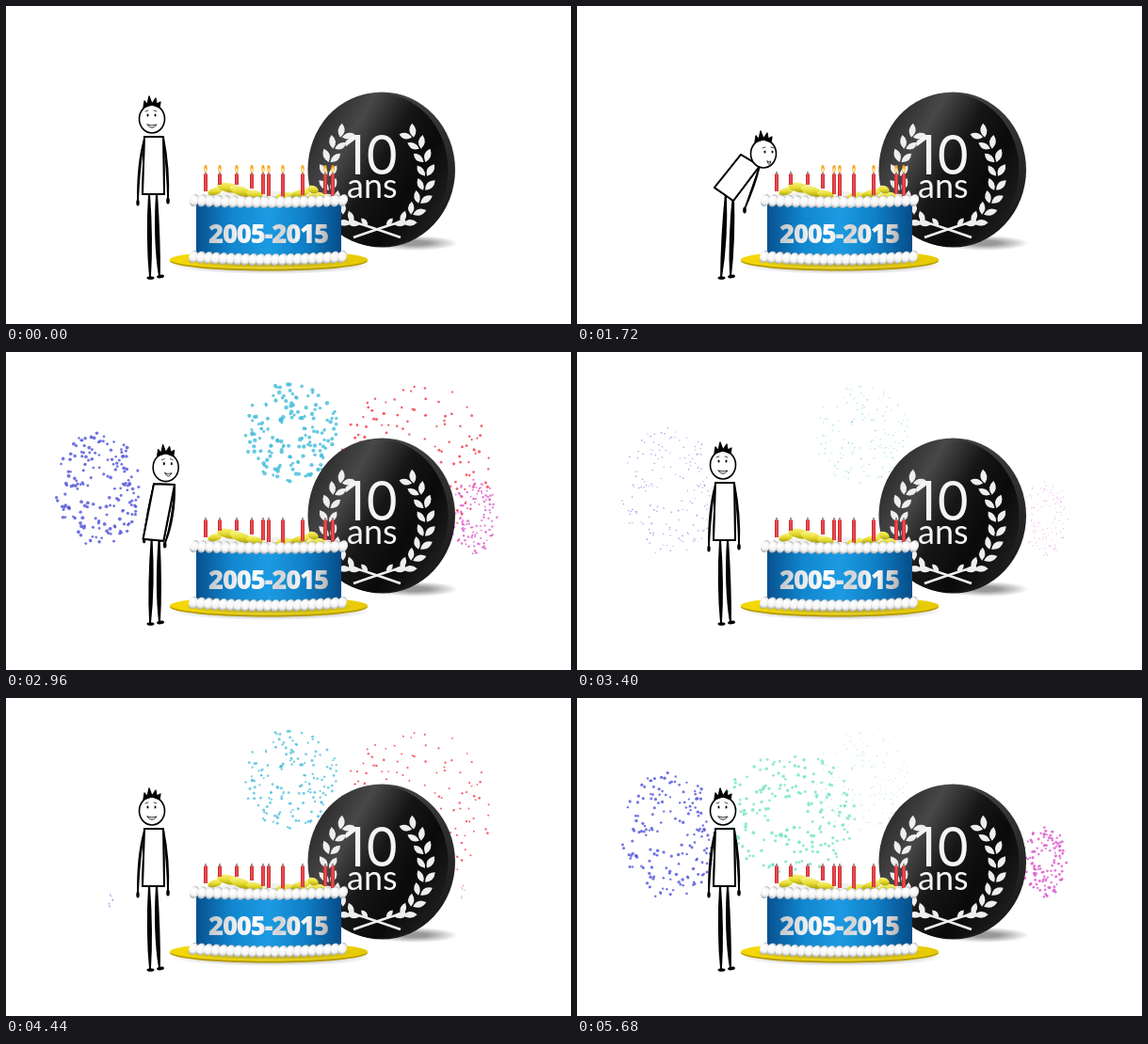
These frames come from a looping animation (600 px wide and 338 px high, 5.72 s). An HTML page with a canvas:

```html
<!DOCTYPE html>
<html lang="fr">
<head>
<meta charset="utf-8">
<title>10 ans</title>
<style>
html, body { margin: 0; width: 100%; height: 100%; overflow: hidden; background: #fff; }
canvas { display: block; }
</style>
</head>
<body>
<canvas id="stage" width="600" height="338"></canvas>
<script>
const LOOP = 5720, STEP = 40, TAU = Math.PI * 2;
const stage = document.getElementById('stage').getContext('2d');
const scenery = document.createElement('canvas');
scenery.width = 600;
scenery.height = 338;

const mix = (a, b, k) => a + (b - a) * k;

function seeded(seed) {
  return () => (seed = (seed * 16807) % 2147483647) / 2147483647;
}

function oval(c, x, y, rx, ry, fill, turn = 0) {
  c.beginPath();
  c.ellipse(x, y, rx, ry, turn, 0, TAU);
  c.fillStyle = fill;
  c.fill();
}

function gradient(c, x0, y0, x1, y1, ...colors) {
  const g = c.createLinearGradient(x0, y0, x1, y1);
  colors.forEach((color, i) => g.addColorStop(i / (colors.length - 1), color));
  return g;
}

function softShadow(c, x, y, rx, ry, alpha) {
  c.save();
  c.translate(x, y);
  c.scale(rx, ry);
  const g = c.createRadialGradient(0, 0, 0.3, 0, 0, 1);
  g.addColorStop(0, `rgba(0,0,0,${alpha})`);
  g.addColorStop(1, 'rgba(0,0,0,0)');
  oval(c, 0, 0, 1, 1, g);
  c.restore();
}

// --- Medal ---
function leaf(c, x, y, angle, length) {
  c.save();
  c.translate(x, y);
  c.rotate(angle);
  c.beginPath();
  c.moveTo(0, 0);
  c.quadraticCurveTo(length * 0.5, -length * 0.5, length, 0);
  c.quadraticCurveTo(length * 0.5, length * 0.42, 0, 0);
  c.fill();
  c.restore();
}

function branch(c, side) {
  c.save();
  c.translate(394, 180);
  c.scale(side, 1);
  for (let i = 0; i < 8; i++) {
    const a = mix(1.02, -0.74, i / 7);
    const x = 53 * Math.cos(a), y = 60 * Math.sin(a);
    const ahead = Math.atan2(-60 * Math.cos(a), 53 * Math.sin(a));
    leaf(c, x, y, ahead + 0.55, 15);
    leaf(c, x - 2, y, ahead - 0.65, 14);
  }
  c.lineWidth = 2.8;
  c.beginPath();
  c.moveTo(30, 48);
  c.quadraticCurveTo(12, 53, -25, 66);
  c.stroke();
  leaf(c, 18, 52, -0.1, 14);
  leaf(c, 10, 54, -0.9, 11);
  c.restore();
}

function medal(c) {
  softShadow(c, 434, 252, 46, 8, 0.4);
  oval(c, 399.5, 174, 77.5, 82.5, gradient(c, 400, 92, 477, 240, '#444', '#2c2c2c', '#161616'));
  oval(c, 395, 174, 74.5, 81.5, gradient(c, 325, 130, 465, 210, '#2a2a2a', '#484848', '#161616', '#0a0a0a', '#1c1c1c'));
  c.fillStyle = c.strokeStyle = gradient(c, 340, 120, 450, 240, '#eee', '#fff', '#d4d4d4');
  branch(c, -1);
  branch(c, 1);
  c.fillStyle = '#f4f4f4';
  c.font = '400 57px Inter, sans-serif';
  c.fillText('10', 358, 178.5);
  c.font = '400 36px Lato, sans-serif';
  c.fillText('ans', 362, 204);
}

// --- Cake ---
const candles = [[212, 197], [227, 190], [245, 190], [261, 194], [273, 200],
  [279, 202], [294, 203], [315, 201], [339, 200], [347, 202]];

function frosting(c, y, bow, x0, x1, count) {
  for (let i = 0; i <= count; i++) {
    const u = i / count * 2 - 1;
    const x = mix(x0, x1, i / count), cy = y + bow * (1 - u * u);
    const g = c.createRadialGradient(x - 1, cy - 2, 1, x, cy, 7);
    g.addColorStop(0, '#fff');
    g.addColorStop(0.55, '#f3f3f3');
    g.addColorStop(1, '#9a9da2');
    oval(c, x, cy, 4.8, 6.8, g, 0.4);
  }
}

function fruit(c, x, y, rx, ry, turn) {
  oval(c, x, y, rx, ry, gradient(c, x, y - ry, x, y + ry, '#f6f07a', '#e6dc30', '#b0a814'), turn);
}

// The largest type size at which the date fills the given width.
function date(c, text, x, y, width, tracking) {
  const font = size => `800 condensed ${size}px "Open Sans", "Liberation Sans", sans-serif`;
  c.font = font(100);
  const size = (width - tracking * text.length) / c.measureText(text).width * 100;
  c.font = font(Math.min(38, size));
  c.letterSpacing = tracking + 'px';
  c.fillText(text, x, y);
  c.letterSpacing = '0px';
}

function cake(c) {
  softShadow(c, 282, 276, 106, 9, 0.35);
  oval(c, 279, 271, 105, 10.5, '#b79c00');
  oval(c, 279, 269.5, 105, 10, gradient(c, 174, 0, 384, 0, '#f3d500', '#ffe92e', '#e6c800'));
  softShadow(c, 279, 271, 92, 9, 0.35);

  c.fillStyle = gradient(c, 202, 0, 356, 0, '#07518f', '#1187cf', '#1c9be2', '#0f7fc6', '#064c88');
  c.beginPath();
  c.moveTo(202, 207);
  c.lineTo(356, 207);
  c.lineTo(356, 266);
  c.quadraticCurveTo(279, 275, 202, 266);
  c.fill();

  oval(c, 279, 205, 82, 8, '#f1f1ec');
  fruit(c, 222, 197, 8, 4, -0.3);
  fruit(c, 236, 193, 12, 5, 0.2);
  fruit(c, 250, 197, 13, 5, 0.35);
  fruit(c, 264, 200, 9, 4, 0.2);
  fruit(c, 297, 203, 11, 5, -0.1);
  fruit(c, 313, 199, 11, 4, -0.3);
  fruit(c, 329, 203, 10, 5, -0.2);
  fruit(c, 326, 195, 6, 4, 0.4);
  for (const [x, foot] of candles) {
    c.fillStyle = '#333';
    c.fillRect(x - 0.5, 176, 1, 3);
    c.fillStyle = gradient(c, x - 2, 0, x + 2.5, 0, '#c9242b', '#f0565a', '#b5151d');
    c.fillRect(x - 2, 178.5, 4, foot - 178.5);
  }
  frosting(c, 206.5, 2, 200, 358, 19);
  frosting(c, 266.5, 3, 199, 357, 20);

  c.fillStyle = gradient(c, 215, 226, 341, 250, '#b9bfc4', '#e4e6e8', '#fff', '#d0d2d4', '#fafafa', '#b8b6b4');
  date(c, '2005-2015', 215, 251.5, 127, -1.2);
}

function flames(t) {
  for (const [x] of candles) {
    if (t >= 1560 + (x - 212) * 4.3) continue;
    oval(stage, x, 173, 1.7, 4, '#f5a623');
    oval(stage, x, 174.5, 0.9, 2.2, '#fff3a0');
  }
}

// --- Fireworks ---
const bursts = [
  { x: 98, y: 145, rx: 51, ry: 70, color: '#5458da', count: 170, size: 0.95, drift: 18, starts: [2640, 3500, 4400, 5300] },
  { x: 302, y: 84, rx: 52, ry: 53, color: '#45bcda', count: 160, size: 1.5, drift: 0, starts: [2560, 3880, 4760] },
  { x: 436, y: 112, rx: 81, ry: 82, color: '#f0303c', count: 140, size: 1.25, drift: 0, starts: [2460, 3860, 4320] },
  { x: 225, y: 121, rx: 73, ry: 65, color: '#74e4c6', count: 200, size: 1.3, drift: 0, starts: [3460, 5240] },
  { x: 496, y: 172, rx: 26, ry: 41, color: '#dc5ccc', count: 130, size: 0.7, drift: -22, starts: [2520, 3440, 4360, 5340] }
];

function burst(b, age, seed) {
  const rand = seeded(seed);
  stage.fillStyle = b.color;
  const dot = (x, y, d) => {
    stage.beginPath();
    stage.arc(x, y, d / 2, 0, TAU);
    stage.fill();
  };
  if (age < 160) {
    const k = age / 160;
    const x = b.x + b.drift * (1 - k), y = mix(242, b.y, k);
    stage.globalAlpha = 0.6;
    for (let i = 0; i < 7; i++) dot(x + rand() * 4 - 2, y + rand() * 16 - 10, 1.5);
  } else {
    const p = (age - 160) / 780;
    const spread = 1 - (1 - Math.min(1, (age - 160) / 240)) ** 2;
    const d = b.size * 3.5 * (1 - p) ** 1.6 + 1.1;
    stage.globalAlpha = 0.85 - 0.4 * p ** 2;
    for (let i = 0; i < b.count; i++) {
      const a = rand() * TAU, r = spread * Math.sqrt(mix(0.06, 1, rand()));
      dot(b.x + b.rx * r * Math.cos(a), b.y + b.ry * r * Math.sin(a) + 4 * p, d * mix(0.75, 1.15, rand()));
    }
  }
  stage.globalAlpha = 1;
}

function fireworks(t) {
  bursts.forEach((b, i) => b.starts.forEach(start => {
    const age = t - start;
    if (age >= 0 && age < 940) burst(b, age, 4271 * (i + 1));
  }));
}

// --- Figure: head, torso corners, near arm, far arm, gaze, mouth half-width ---
const upright = [155, 120, 147, 139, 167, 139, 168, 200, 145, 200, 171, 173, 172, 206, 142, 171, 140, 208, 0, 0, 5];
const curious = [177, 124, 162, 141, 185, 142, 167, 201, 146, 198, 179, 175, 167, 203, 156, 168, 150, 194, 4, 0, 3];
const leaning = [185, 126, 163, 142, 186, 146, 166, 202, 143, 195, 182, 178, 173, 206, 155, 169, 149, 190, 6, 2, 2.5];
const bent = [198, 157, 174, 158, 194, 170, 166, 207, 146, 193, 187, 192, 178, 216, 163, 176, 154, 194, 6, 2, 2];
const keys = [[240, upright], [800, upright.map((v, i) => mix(v, curious[i], 0.65))], [920, curious],
  [1180, leaning], [1440, bent], [2440, bent], [2600, leaning], [2840, curious], [3200, upright]];

function poseAt(t) {
  const next = keys.findIndex(k => k[0] > t);
  if (next < 1) return upright;
  const [t0, from] = keys[next - 1], [t1, to] = keys[next];
  return from.map((v, i) => mix(v, to[i], (t - t0) / (t1 - t0)));
}

function line(width, x, y, ...points) {
  stage.lineWidth = width;
  stage.beginPath();
  stage.moveTo(x, y);
  for (let i = 0; i < points.length; i += 2) stage.lineTo(points[i], points[i + 1]);
  stage.stroke();
}

// A limb swells towards its middle.
function limb(x0, y0, mx, my, x1, y1, swell) {
  const cx = 2 * mx - (x0 + x1) / 2, cy = 2 * my - (y0 + y1) / 2;
  stage.fillStyle = '#000';
  stage.beginPath();
  stage.moveTo(x0 - 0.9, y0);
  stage.quadraticCurveTo(cx - swell, cy, x1 - 0.9, y1);
  stage.lineTo(x1 + 0.9, y1);
  stage.quadraticCurveTo(cx + swell, cy, x0 + 0.9, y0);
  stage.fill();
}

function figure(t) {
  const [hx, hy, ax, ay, bx, by, cx, cy, dx, dy, ex, ey, nx, ny, fx, fy, gx, gy, lookX, lookY, smile] = poseAt(t);
  stage.strokeStyle = '#000';
  stage.lineCap = stage.lineJoin = 'round';

  limb(ax, ay + 2, fx, fy, gx, gy, 2);
  oval(stage, gx, gy + 1, 1.7, 3.6, '#000');

  const hipX = 152 + lookX, hipY = (cy + dy) / 2;
  limb(hipX, hipY - 2, mix(hipX, 153, 0.4), 246, 153, 289, 4.2);
  limb(hipX + 8, hipY - 2, mix(hipX + 8, 162, 0.4), 246, 163, 288, 4.2);
  oval(stage, 153.5, 289, 4, 1.8, '#000');
  oval(stage, 164, 287.5, 4, 1.8, '#000', -0.15);

  stage.fillStyle = '#fff';
  line(2, ax, ay, bx, by, cx, cy, dx, dy, ax, ay);
  stage.fill();
  stage.stroke();

  limb(bx, by, ex, ey, nx, ny, 2);
  oval(stage, nx, ny + 1, 1.8, 3.6, '#000');

  oval(stage, hx, hy, 13.5, 15, '#fff');
  stage.lineWidth = 1.6;
  stage.stroke();
  stage.fillStyle = '#000';
  line(1.3, hx - 9, hy - 12, hx - 8, hy - 19, hx - 5, hy - 15, hx - 3, hy - 24,
    hx, hy - 16, hx + 4, hy - 22, hx + 5, hy - 16, hx + 9, hy - 18, hx + 8, hy - 12, hx, hy - 15, hx - 9, hy - 12);
  stage.fill();

  const x = hx + lookX, y = hy + lookY;
  oval(stage, x - 4.5, y - 4, 1, 1.6, '#000');
  oval(stage, x + 3.5, y - 4, 1, 1.6, '#000');
  line(0.7, x - 7, y - 8, x - 4, y - 9);
  line(0.7, x + 2, y - 9, x + 5, y - 8);
  stage.lineWidth = 0.8;
  stage.beginPath();
  stage.moveTo(x - smile, y + 6);
  stage.quadraticCurveTo(x, y + 13, x + smile, y + 6);
  stage.quadraticCurveTo(x, y + 8, x - smile, y + 6);
  stage.stroke();
}

const still = scenery.getContext('2d');
medal(still);
cake(still);

function draw(now) {
  const t = Math.floor(now % LOOP / STEP) * STEP;
  stage.fillStyle = '#fff';
  stage.fillRect(0, 0, 600, 338);
  fireworks(t);
  stage.drawImage(scenery, 0, 0);
  flames(t);
  figure(t);
}

const begin = performance.now();
function tick() {
  draw(performance.now() - begin);
  requestAnimationFrame(tick);
}
tick();
</script>
</body>
</html>
```
